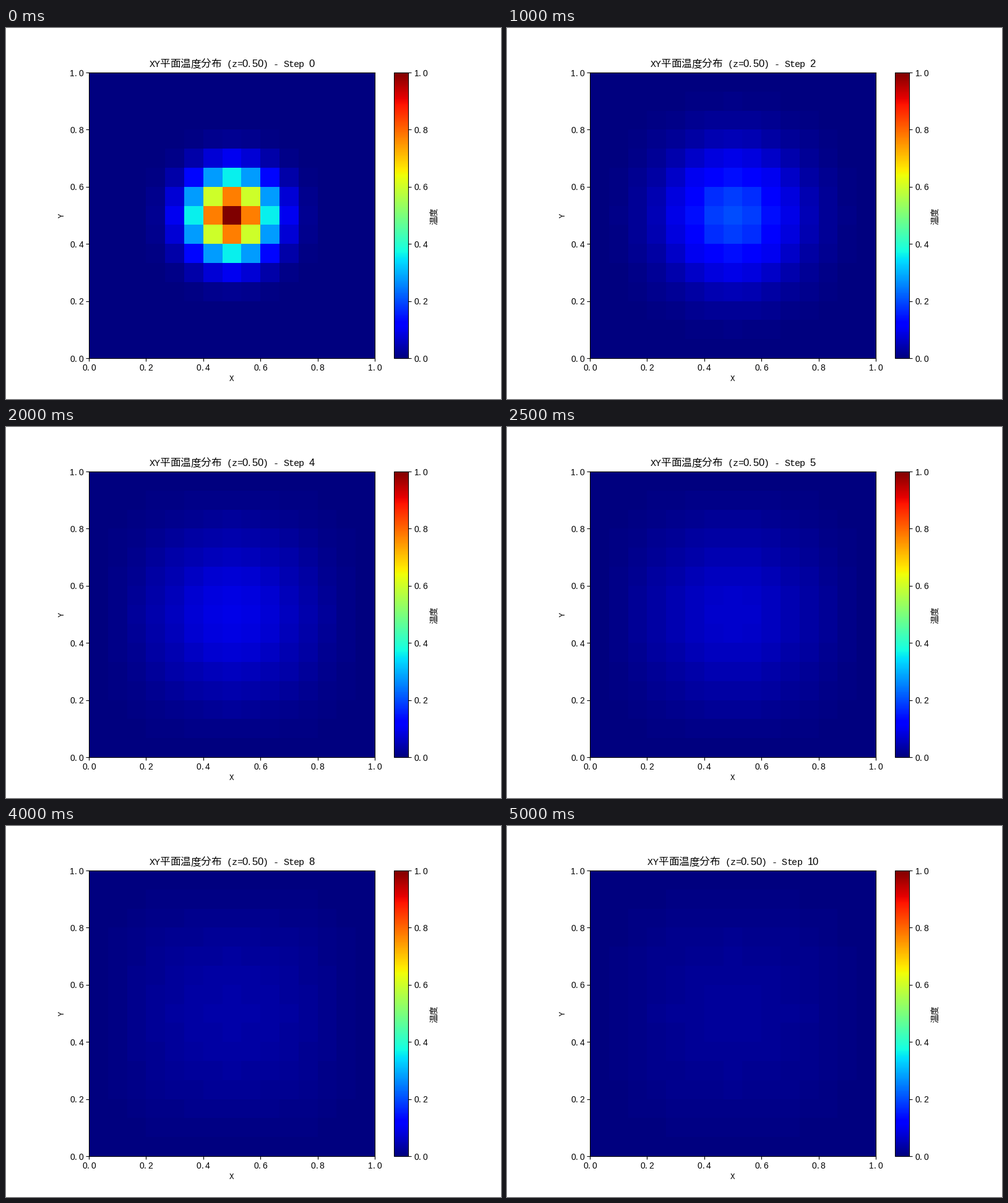
Recreate the animation shown at these times as a matplotlib script. Size 800x600 px, loop 5500 ms.

```python
import numpy as np
import matplotlib.pyplot as plt
from matplotlib.animation import ArtistAnimation
from matplotlib.transforms import IdentityTransform

W, H, DPI = 800, 600, 100
N = 15            # grid points per axis, zero temperature on the walls
STEPS = 11
DIFFUSION = 0.005  # diffusivity times the duration of one step
CJK = "Noto Sans CJK JP"


def profile(step):
    """One-dimensional factor of the separable heat solution."""
    x = np.linspace(0, 1, N)
    start = np.exp(-50 * (x - 0.5) ** 2)
    if step == 0:
        return start
    k = np.arange(1, N - 1)
    modes = np.sin(np.pi * np.outer(k, x))
    rate = 2 * (N - 1) ** 2 * (1 - np.cos(np.pi * k / (N - 1)))
    amps = 2 / (N - 1) * modes @ start
    return (amps * np.exp(-rate * DIFFUSION * step)) @ modes


def slice_xy(step):
    a = profile(step)
    return np.outer(a, a) * a[N // 2]


def put(x, y, s, size, **kw):
    """Text at stage pixels, y counted from the top."""
    return fig.text(x, H - y, s, fontsize=size,
                    transform=IdentityTransform(), **kw)


def cells(x, y, s, size, align=0.5):
    """Terminal-like text: half-em cells for Latin, full-em cells for Han."""
    em = size * DPI / 72
    widths = [em if ord(c) > 255 else em / 2 for c in s]
    x -= align * sum(widths)
    out = []
    for c, w in zip(s, widths):
        mid = x + w / 2
        if ord(c) > 255:
            family, scale = CJK, 1
        elif c.isdigit() or c == ".":
            family, scale = "Liberation Sans", 1
        else:
            family, scale = "Liberation Mono", 0.9
        if c == ".":
            mid -= 0.1 * em
        if c != " ":
            out.append(put(mid, y, c, size * scale, family=family,
                           ha="center", va="baseline"))
        x += w
    return out


fig, ax = plt.subplots(figsize=(W / DPI, H / DPI), dpi=DPI)
frames = []
for step in range(STEPS):
    im = ax.imshow(slice_xy(step), cmap="jet", vmin=0, vmax=1,
                   origin="lower", extent=(0, 1, 0, 1))
    title = cells(365, 63, f"XY平面温度分布 (z=0.50) - Step {step}", 12)
    frames.append([im, *title])

bar = fig.colorbar(frames[0][0], ax=ax)
ax.tick_params(labelbottom=False, labelleft=False)
bar.ax.tick_params(labelright=False)

for v in np.linspace(0, 1, 6):
    label = f"{v:.1f}"
    row = 534 - 462 * v + 5.5
    cells(134 + 462 * v, 554, label, 10)
    cells(124.5, row, label, 10, align=1)
    cells(660, row, label, 10, align=0)

cells(365, 571, "X", 10)
put(90.5, 303, "Y", 9, family="Liberation Mono", rotation=90,
    ha="center", va="center")
put(692, 304, "温度", 10, family=CJK, rotation=90, ha="center", va="center")

anim = ArtistAnimation(fig, frames, interval=500, repeat=True, repeat_delay=0)
plt.show()
```
